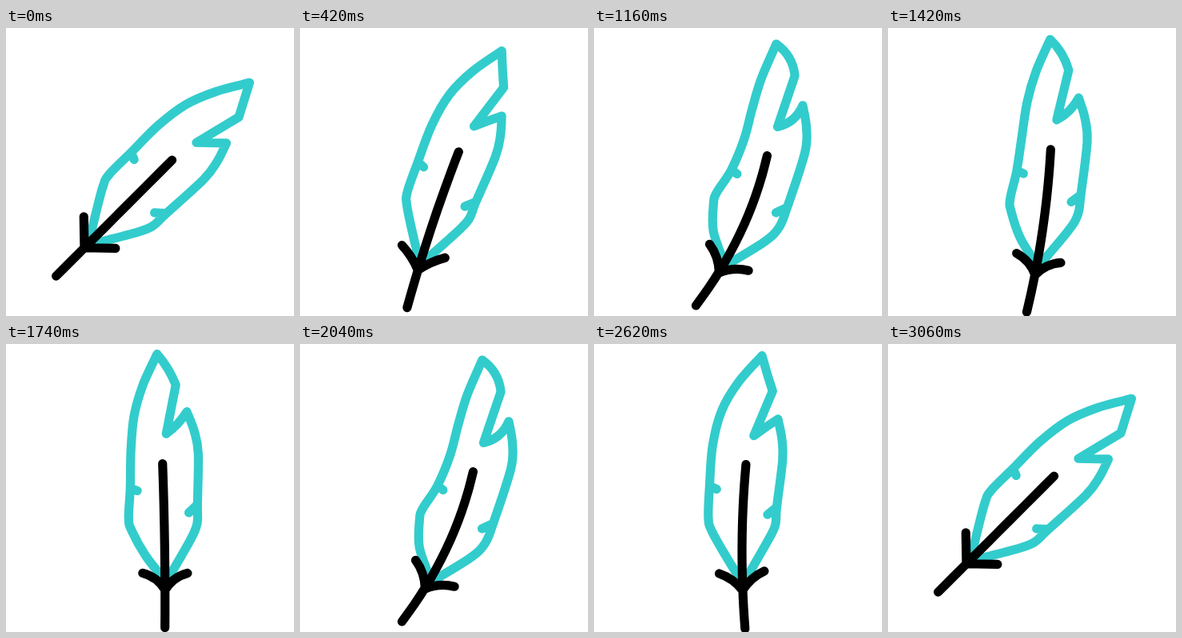
These frames come from a looping animation (360x360 px, 3.22 s). An HTML page with a canvas:

```html
<!DOCTYPE html>
<html lang="en">
<head>
<meta charset="utf-8">
<title>Feather</title>
<style>
  html, body { margin: 0; width: 100%; height: 100%; overflow: hidden; background: #fff; }
  canvas { display: block; width: 360px; height: 360px; }
</style>
</head>
<body>
<canvas id="stage" width="360" height="360"></canvas>
<script>
const ctx = document.getElementById('stage').getContext('2d');
const LOOP = 3220, STEP = 20;
const TEAL = '#33cccc', BLACK = '#000';

// The feather stands upright around (0, 0), with its quill along x = AXIS.
const AXIS = 9;
const tip = [9, -167], shoulder = [30, -127], notch = [15, -67], point = [42, -93];
const leftEdge = [[5, 111], [-11, 85], [-29, 54], [-34, 38], [-34, 0], [-34, -48], [-28, -91], [-13, -129], tip];
const rightEdge = [point, [50, -69], [54, -41], [51, 23], [50, 46], [40, 68], [11, 117]];
const leftBarb = [[-33, 0], [-25, 3]], rightBarb = [[51, 22], [40, 32]];
const joint = [AXIS, 125], arms = [[-19, 98], [37, 98]];
const quill = Array.from({ length: 9 }, (_, i) => [AXIS, -30 + i * 205 / 8]);

// turn in degrees, bend of the quill, sideways push of its middle, sag of the arms
const rest = { turn: 45, bend: 0, push: 0, sag: 0 };
const left = { turn: -15, bend: 0.0006, push: -2, sag: 10 };
const right = { turn: 22.8, bend: -0.0014, push: 25.6, sag: 7 };

// start time, pose, ease handles towards the next pose
const keys = [
  [200, rest, 0.333, 0.28],
  [900, left, 0.333, 0.667],
  [1250, right, 0.333, 0.667],
  [1600, left, 0.333, 0.667],
  [1950, right, 0.333, 0.667],
  [2300, left, 0.369, 0.794],
  [3060, rest]
];

const mix = (a, b, k) => a + (b - a) * k;

// Cubic ease with flat ends; x1 and x2 are the handle positions in time.
function ease(u, x1, x2) {
  let lo = 0, hi = 1;
  for (let i = 0; i < 24; i++) {
    const s = (lo + hi) / 2, r = 1 - s;
    const x = 3 * r * r * s * x1 + 3 * r * s * s * x2 + s * s * s;
    if (x < u) lo = s; else hi = s;
  }
  return lo * lo * (3 - 2 * lo);
}

function poseAt(t) {
  const i = keys.findIndex(([from], n) => n < keys.length - 1 && t >= from && t < keys[n + 1][0]);
  if (i < 0) return rest;
  const [from, p, x1, x2] = keys[i], [to, q] = keys[i + 1];
  const k = ease((t - from) / (to - from), x1, x2);
  const now = {};
  for (const name in p) now[name] = mix(p[name], q[name], k);
  return now;
}

// Smooth curve through the points.
function trace(pts) {
  const last = pts.length - 1;
  ctx.moveTo(...pts[0]);
  for (let i = 0; i < last; i++) {
    const a = pts[Math.max(i - 1, 0)], b = pts[i];
    const c = pts[i + 1], d = pts[Math.min(i + 2, last)];
    ctx.bezierCurveTo(
      b[0] + (c[0] - a[0]) / 6, b[1] + (c[1] - a[1]) / 6,
      c[0] - (d[0] - b[0]) / 6, c[1] - (d[1] - b[1]) / 6,
      c[0], c[1]);
  }
}

// Line from a to b that bulges to one side by the given height.
function bow(a, b, height) {
  const dx = b[0] - a[0], dy = b[1] - a[1], f = 2 * height / Math.hypot(dx, dy);
  ctx.moveTo(...a);
  ctx.quadraticCurveTo((a[0] + b[0]) / 2 - dy * f, (a[1] + b[1]) / 2 + dx * f, ...b);
}

function ink(color, shape) {
  ctx.beginPath();
  shape();
  ctx.strokeStyle = color;
  ctx.stroke();
}

function draw(t) {
  const { turn, bend, push, sag } = poseAt(t);
  const warp = ([x, y]) => [x + push + bend * y * y, y * (1 - 3 * bend * (x - AXIS))];
  const sway = ([x, y]) => {
    const shift = x < 0 ? 0.55 * push * Math.sin(Math.PI * (20 - y) / 170) : 0;
    const [wx, wy] = warp([x, y]);
    return [wx + shift, wy];
  };

  ctx.setTransform(1, 0, 0, 1, 0, 0);
  ctx.fillStyle = '#fff';
  ctx.fillRect(0, 0, 360, 360);
  ctx.translate(180, 180);
  ctx.rotate(turn * Math.PI / 180);
  ctx.lineWidth = 11.2;
  ctx.lineCap = ctx.lineJoin = 'round';

  ink(TEAL, () => {
    trace(leftEdge.map(sway));
    trace(leftBarb.map(sway));
    trace(rightEdge.map(warp));
    trace(rightBarb.map(warp));
    bow(warp(tip), warp(shoulder), -0.25 * push);
    bow(warp(shoulder), warp(notch), 0);
    bow(warp(notch), warp(point), 0.25 * push);
  });
  ink(BLACK, () => {
    trace(quill.map(warp));
    const [jx, jy] = warp(joint);
    arms.forEach((arm, i) => {
      const [x, y] = warp(arm);
      bow([x, y + sag], [jx, jy + sag / 3], (i ? 0.4 : -0.4) * sag);
    });
  });
}

const begin = performance.now();
function tick() {
  const t = (performance.now() - begin) % LOOP;
  draw(Math.floor(t / STEP) * STEP);
  requestAnimationFrame(tick);
}
tick();
</script>
</body>
</html>
```
